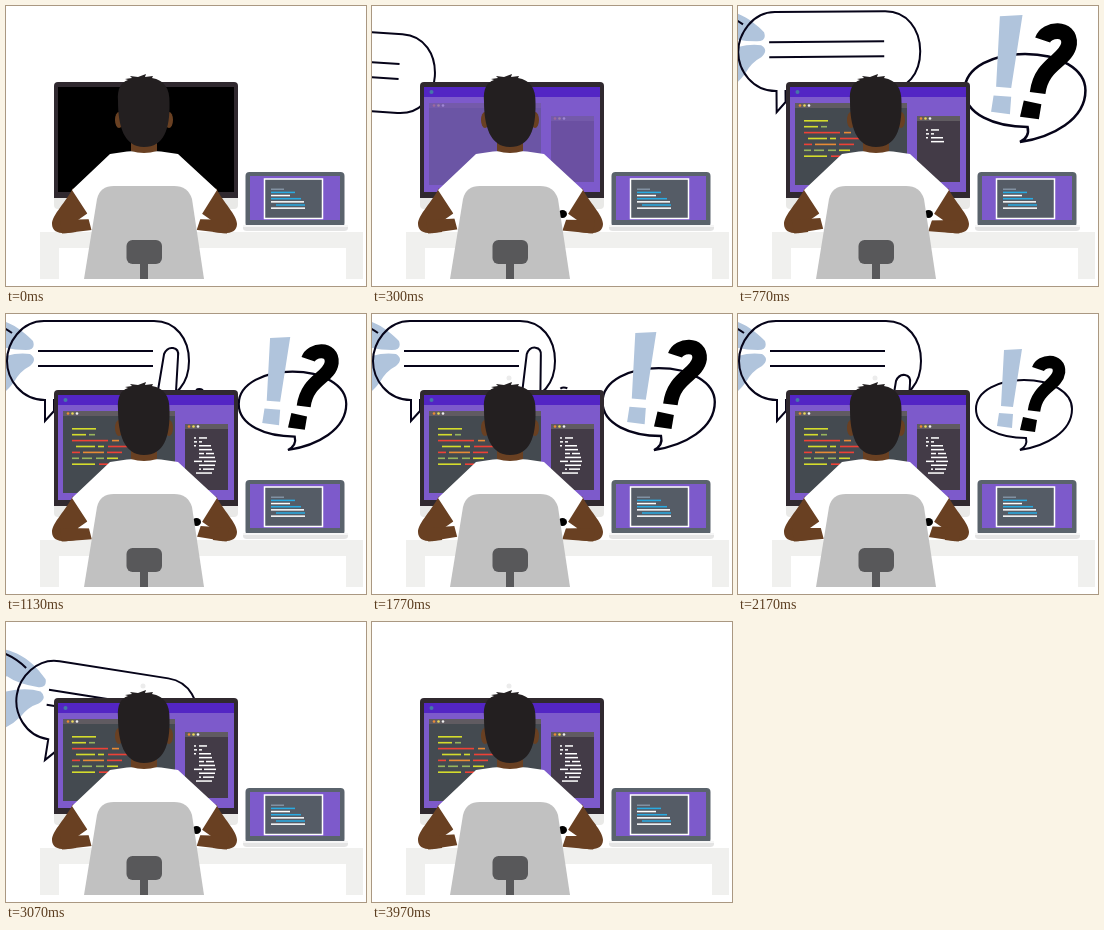
Animation of 360x280 px, one loop 4.01 s. Source, as an HTML page:

```html
<!DOCTYPE html>
<html lang="en">
<head>
<meta charset="utf-8">
<title>Coder at work</title>
<style>
html, body { margin: 0; width: 360px; height: 280px; overflow: hidden; background: #fff }
svg { display: block }
.ink { stroke: #060419; stroke-width: 2; fill: none }
.paper { fill: #fff }
.blue { fill: #b0c4dc }
.skin { fill: #694022 }
</style>
</head>
<body>
<svg width="357" height="273">
  <!-- speech bubble held by a hand -->
  <g id="speech">
    <path class="paper" d="M38 7H148C170 7 183 25 183 47S170 86 148 86H48V97L39 107V86C15 86 1 65 1 47S15 7 38 7Z"/>
    <path class="blue" d="M-60 0L-17 4C5 6 18 18 27 27Q30 36 20 36Q0 36-12 30L-20 50Q5 37 24 40Q32 45 24 52Q14 57 8 68Q-5 86-30 92L-80 80Z"/>
    <path class="ink" d="M38 7H148C170 7 183 25 183 47S170 86 148 86H48V97L39 107V86C15 86 1 65 1 47S15 7 38 7ZM32 37H147M32 52H147M-18 8Q-5 11 6 19"/>
  </g>
  <g id="finger">
    <path class="ink" style="fill:#fff" d="M146 112L158 40Q161 33 167 34Q173 35 172 42L168 112"/>
    <path class="ink" d="M190 76Q193 74 197 76"/>
  </g>
  <!-- question bubble -->
  <g id="doubt">
    <path class="ink" style="fill:#fff" d="M238 95C238 76 262 66 286 66C313 66 334 78 334 95C334 118 308 132 282 136Q290 132 288 124C262 124 238 114 238 95Z"/>
    <path class="blue" d="M266 36L284 35L275 93L263 92ZM261 99L275 100L274 114L259 112Z"/>
    <path d="M300 55C303 46 322 44 321 58C319 72 299 73 296 97" fill="none" stroke="#000" stroke-width="12.5"/>
    <path d="M285 103L299 106L297 118L282 116Z"/>
  </g>

  <path fill="#f0f0ee" d="M34 226H357V273H340V242H53V273H34Z"/>
  <!-- monitor -->
  <path fill="#e9e9e7" d="M48 190H232V199Q232 203 228 203H52Q48 203 48 199Z"/>
  <path fill="#30292f" d="M52 76H228Q232 76 232 80V192H48V80Q48 76 52 76Z"/>
  <path d="M52 81H228V186H52Z"/>
  <g id="desktop">
    <path fill="#7d5acb" d="M52 81H228V186H52Z"/>
    <path fill="#5325c4" d="M52 81H228V91H52Z"/>
    <circle cx="59.5" cy="86" r="2" fill="#4578a8"/>
  </g>
  <g id="windows">
    <path fill="#444a50" d="M57 97H169V179H57Z"/>
    <path fill="#433b47" d="M179 110H222V176H179Z"/>
    <path fill="#605b61" d="M57 97H169V102H57ZM179 110H222V115H179Z"/>
    <g id="dots"></g>
  </g>
  <g id="code"></g>
  <g id="list"></g>

  <!-- laptop -->
  <rect x="239.500" y="166" width="99" height="55" rx="4" fill="#5a636c"/>
  <path fill="#7d5acb" d="M244 170H334V214H244Z"/>
  <path fill="#555c66" stroke="#fff" stroke-width="1.5" d="M258.500 173H316.500V212.500H258.500Z"/>
  <g id="notes"></g>
  <path fill="#e4e4e4" d="M237 219H342V222Q342 225 338 225H241Q237 225 237 222Z"/>
  <path fill="#f6f6f6" d="M237 219H342V221H237Z"/>

  <!-- person -->
  <circle id="spot" cx="137" cy="64" r="2.500" fill="#ececec"/>
  <g id="arms"></g>
  <path class="paper" d="M104 148Q138 141 172 148L211 184L196 208L190 226H86L81 207L66 184Z"/>
  <ellipse id="mouse" cx="190.500" cy="208" rx="4.500" ry="4"/>
  <path class="skin" d="M125 130H151V145Q138 149 125 145Z"/>
  <ellipse class="skin" cx="113" cy="114" rx="4" ry="8"/>
  <ellipse class="skin" cx="163" cy="114" rx="4" ry="8"/>
  <path fill="#231f20" d="M112 95C111 83 115 76 122 74L119 73L126 72L124 70L132 71L140 68L139 71L147 70L146 72C158 74 164 82 163.500 97C164 123 158 141 138 141S112 120 112 95Z"/>
  <path fill="#c1c1c1" d="M78 273L91 193Q94 180 108 180H168Q182 180 186 193L198 273Z"/>
  <path fill="#58585a" d="M134 250H142V273H134Z"/>
  <rect x="120.500" y="234" width="35.500" height="24" rx="6" fill="#58585a"/>
</svg>
<script>
const LOOP = 4010;
const $ = id => document.getElementById(id);
const set = (id, name, value) => $(id).setAttribute(name, value);
const colors = { y: '#d4dc2c', r: '#ee4136', g: '#98b45c', o: '#e98a35', w: '#fff', b: '#29abe2', s: '#8291a2' };

// Each row lists "color start end" dashes.
function drawRows(id, top, step, height, rows) {
  $(id).innerHTML = rows.map((row, i) => '<g>' + row.split(',').map(dash => {
    const [c, a, b] = dash.split(' ');
    return `<rect x="${a}" y="${top + i * step}" width="${b - a}" height="${height}" fill="${colors[c]}"/>`;
  }).join('') + '</g>').join('');
}

drawRows('code', 114, 5.9, 1.6, [
  'y 66 90', 'y 66 80,g 83 89', 'r 66 102,o 106 113', 'y 70 89,y 92 98,r 102 124',
  'r 66 74,o 77 98,r 101 116', 'g 66 73,g 76 86,g 90 98,y 101 112', 'y 66 89,r 93 102,y 105 116'
]);
drawRows('list', 123.2, 3.9, 1.5, [
  'w 188 190,w 193 201', 'w 188 191,w 193 196', 'w 188 190,w 193 205', 'w 193 206', 'w 193 198,w 200 208',
  'w 193 209', 'w 188 196,w 198 210', 'w 193 209', 'w 193 195,w 197 208', 'w 190 206'
]);
drawRows('notes', 182.5, 3.15, 1.5, [
  's 265 278', 'b 265 289', 'w 265 284', 'b 265 295', 'w 265 298', 'b 270 299', 'w 265 299'
]);

$('dots').innerHTML = [[62, 99.5], [183, 112.5]].map(([x, y]) =>
  ['#e98a35', '#e8d75a', '#eee'].map((c, i) =>
    `<circle cx="${x + i * 4.5}" cy="${y}" r="1.300" fill="${c}"/>`).join('')).join('');

const arm = `<path class="skin" d="M67 182C60 196 46 209 46 218C46 226 54 228 62 227L70 226L72 214L82 207Z"/>
  <path class="skin hand" d="M54 214L90 213V223.500L56 227.500Z"/>`;
$('arms').innerHTML = `<g>${arm}</g><g transform="matrix(-1 0 0 1 277 0)">${arm}</g>`;
const hands = document.querySelectorAll('.hand');

const ramp = (t, a, b) => Math.min(1, Math.max(0, (t - a) / (b - a)));
const smooth = k => k * k * (3 - 2 * k);

// Eased value between [time, value] pairs.
function track(t, keys) {
  const i = keys.findIndex(k => t < k[0]);
  if (i < 0) return keys[keys.length - 1][1];
  if (!i) return keys[0][1];
  const [a, b] = [keys[i - 1], keys[i]];
  return a[1] + (b[1] - a[1]) * smooth(ramp(t, a[0], b[0]));
}

function draw(t) {
  const x = track(t, [[70, -240], [520, -3], [620, -2.6], [900, 0], [2190, 0], [2530, 9.3], [3070, 17.2], [3230, -230]]);
  const y = track(t, [[70, 26], [520, -1.6], [620, -1.4], [900, 0], [2190, 0], [2530, 17.3], [3070, 26.3], [3230, 34]]);
  const turn = track(t, [[70, 9], [520, -1.2], [620, -1], [900, 0], [2190, 0], [2530, 5], [3070, 9], [3230, 12]]);
  set('speech', 'transform', `translate(${x} ${y}) rotate(${turn})`);

  const size = track(t, [[430, 0], [600, 1], [780, 1.26], [1050, 1.12], [1670, 1.12], [1900, 1.24], [2170, 1], [2360, 0]]);
  set('doubt', 'transform', `translate(282 136) scale(${size}) translate(-282 -136)`);

  const drop = track(t, [[650, 60], [1050, 0], [1900, 0], [2170, 27], [2330, 60]]);
  const wag = 3 * Math.sin(ramp(t, 1130, 1900) * Math.PI * 4);
  set('finger', 'transform', `translate(0 ${drop}) rotate(${wag} 158 112)`);
  set('finger', 'opacity', drop < 59 ? 1 : 0);

  set('desktop', 'opacity', ramp(t, 70, 240));
  set('windows', 'opacity', ramp(t, 250, 420));
  const rise = ramp(t, 450, 700);
  set('code', 'opacity', rise);
  set('code', 'transform', `translate(0 ${track(t, [[450, 22], [750, 0]])})`);
  [...$('list').children].forEach((row, i) => row.setAttribute('opacity', t > 660 + i * 35 ? 1 : 0));
  set('mouse', 'opacity', t > 300 ? 1 : 0);
  set('spot', 'opacity', t > 1700 ? 1 : 0);

  const tap = t < 70 ? 0 : Math.sin((t - 70) / 250 * Math.PI * 2) * 2.5;
  hands.forEach((hand, i) => hand.setAttribute('transform', `rotate(${i ? -tap : tap} 54 220)`));
}

function frame() {
  draw(performance.now() % LOOP);
  requestAnimationFrame(frame);
}
frame();
</script>
</body>
</html>
```
